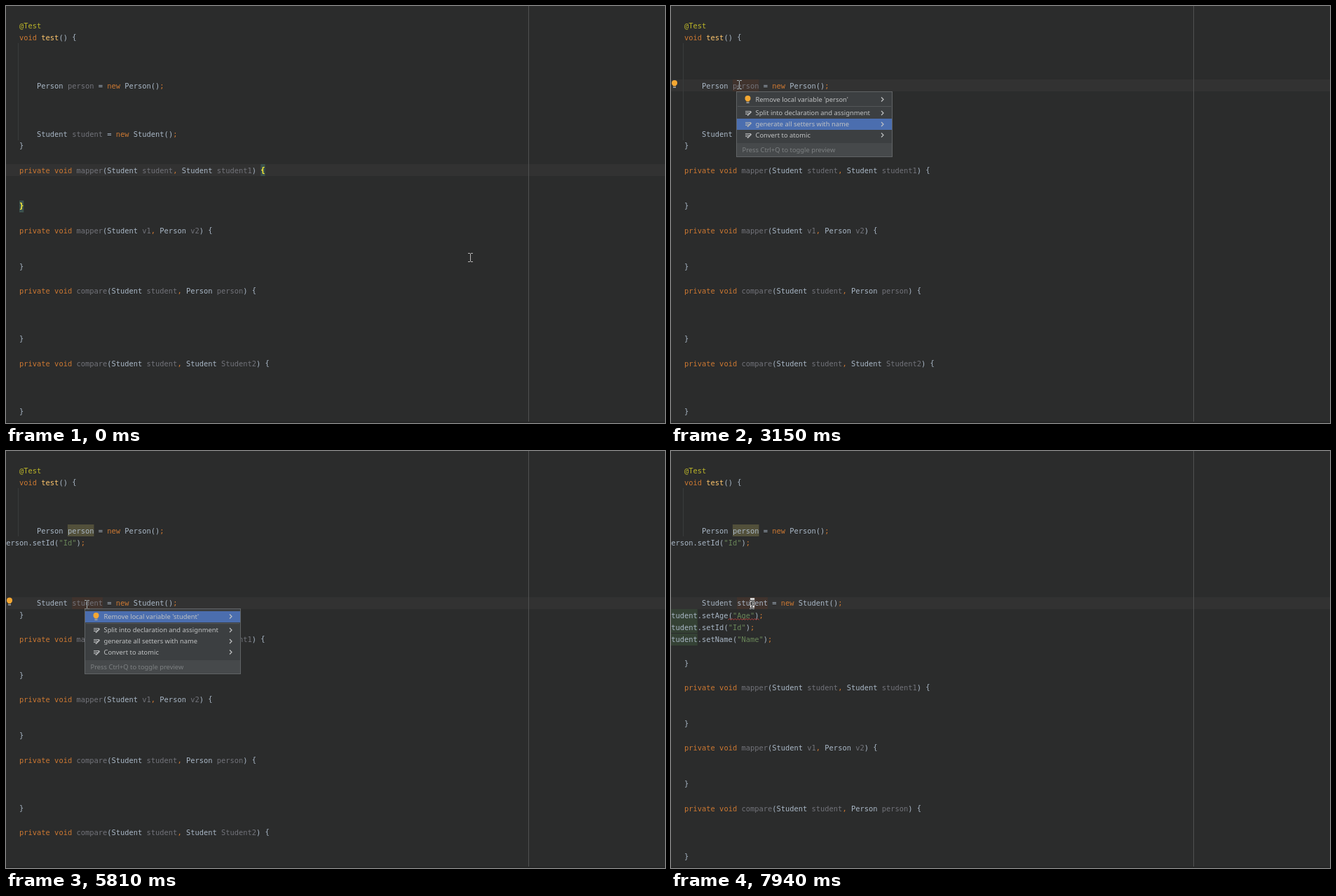
These frames come from a looping animation (940 px wide and 596 px high, 8 s). An HTML page with a canvas:

```html
<!DOCTYPE html>
<html lang="en">
<head>
<meta charset="utf-8">
<title>Editor</title>
<style>
html, body { margin: 0; width: 100%; height: 100%; overflow: hidden; background: #2b2c2c; }
canvas { display: block; }
</style>
</head>
<body>
<canvas id="stage" width="940" height="596"></canvas>
<script>
const g = document.getElementById('stage').getContext('2d');
const LOOP = 8000, CHAR = 6.26, PITCH = 17.25;
const CODE = '10.4px "DejaVu Sans Mono", monospace';
const MENU = '9.35px "Noto Sans", "Open Sans", sans-serif';
const C = {
  text: '#a9b7c6', key: '#cc7832', note: '#bbb529', method: '#ffc66d', unused: '#72737a',
  string: '#6a8759', bg: '#2b2c2c', row: '#323232', write: '#40332d', read: '#52503a',
  template: '#344134', caret: '#d4d4d4', match: '#3b514d', bulb: '#f4a732'
};

const colX = col => -6 + col * CHAR;
const rowTop = n => Math.round(19 + n * PITCH);
const rowMid = n => Math.floor(28 + n * PITCH);
const within = (t, a, b) => t >= a && t < b;

function rect(color, x, y, w, h) {
  g.fillStyle = color;
  g.fillRect(x, y, w, h);
}

function label(str, x, y, color, font) {
  g.font = font;
  g.fillStyle = color;
  g.fillText(str, x, y);
}

function stroke(color, width, points) {
  g.strokeStyle = color;
  g.lineWidth = width;
  g.beginPath();
  points.forEach(([x, y]) => g.lineTo(x, y));
  g.stroke();
}

// Background behind a run of characters
function mark(color, row, col, count) {
  rect(color, colX(col), rowTop(row), count * CHAR, 17);
}

function lines(t) {
  const out = ['    @Test', '    void test() {', '', '', '', '        Person person = new Person();'];
  out.push(...(t < 3680 ? ['', '', ''] : ['person.setId("Id");', '', '', '', '']));
  out.push('        Student student = new Student();');
  if (t >= 7330) out.push('student.setAge("Age");', 'student.setId("Id");', 'student.setName("Name");', '');
  const method = (head, gap) => out.push('', '    private void ' + head + ' {', ...Array(gap).fill(''), '    }');
  out.push('    }');
  method('mapper(Student student, Student student1)', 2);
  method('mapper(Student v1, Person v2)', 2);
  method('compare(Student student, Person person)', 3);
  method('compare(Student student, Student Student2)', 3);
  return out;
}

function tokenColor(word, lit) {
  if (/^(private|void|new|[;,])$/.test(word)) return C.key;
  if (word[0] === '"') return C.string;
  if (word[0] === '@') return C.note;
  if (word === 'test') return C.method;
  if (!lit && /^(mapper|compare|student1?|person|v[12]|Student2)$/.test(word)) return C.unused;
  return C.text;
}

// Braces sit a little higher than the letters
function token(word, row, col, color, font = CODE) {
  const rise = /[{}]/.test(word) ? 1 : 0;
  label(word, colX(col), rowMid(row) + 4 - rise, color, font);
}

function codeLine(str, n, lit) {
  for (const m of str.matchAll(/"\w*"|@?\w+|[^\s\w]/g))
    token(m[0], n, m.index, tokenColor(m[0], lit));
}

function drawCaret(row, col, ch) {
  rect(C.caret, colX(col), rowMid(row) - 7, CHAR, 14);
  token(ch, row, col, C.bg);
}

function bulb(x, y) {
  g.fillStyle = C.bulb;
  g.beginPath();
  g.arc(x, y - 1.5, 4, 0, 7);
  g.fill();
  rect(C.bulb, x - 2, y + 1, 4, 2);
  rect('#a5a8aa', x - 2, y + 4, 4, 1.5);
}

function pencil(x, y) {
  const c = '#afb1b3';
  rect(c, x - 4, y - 3, 8, 1);
  rect(c, x - 4, y - 1, 5, 1);
  rect(c, x - 4, y + 1, 3, 1);
  stroke(c, 2, [[x - 1, y + 3.5], [x + 4.5, y - 2]]);
}

function menu(x, y, name, selected) {
  rect('#606365', x, y, 223, 94);
  rect('#3c3f41', x + 1, y + 1, 221, 92);
  rect('#46494b', x + 1, y + 74, 221, 19);
  rect('#535658', x + 2, y + 21, 219, 1);
  const items = [`Remove local variable '${name}'`, 'Split into declaration and assignment',
    'generate all setters with name', 'Convert to atomic'];
  items.forEach((item, i) => {
    const mid = y + [11.5, 31, 47, 62.5][i];
    if (i === selected) rect('#4b6eaf', x + 1, Math.round(mid - 8), 221, 16);
    if (i) pencil(x + 17, Math.round(mid));
    else bulb(x + 16.5, mid);
    label(item, x + 27.5, Math.round(mid + 3), '#c0c2c3', MENU);
    stroke('#c0c2c3', 1.2, [[x + 207, mid - 3], [x + 210, mid], [x + 207, mid + 3]]);
  });
  label('Press Ctrl+Q to toggle preview', x + 8.5, y + 87, '#7d8082', MENU);
}

const path = [
  [70, 662, 359], [140, 610, 333], [270, 430, 245], [400, 260, 160], [540, 138, 103],
  [610, 104, 92], [680, 88, 91], [740, 87, 99], [805, 91, 109], [880, 95, 111], [1010, 97, 112],
  [4300, 97, 112], [4355, 122, 110], [4490, 122, 110], [4630, 128, 150], [4760, 122, 195],
  [4890, 115, 219], [LOOP + 99, 115, 219]
];

function pointer(t) {
  const s = Math.max(70, Math.ceil(t / 67) * 67);
  const i = path.findIndex(p => p[0] > s);
  const [a, b] = [path[i - 1], path[i]];
  const k = (s - a[0]) / (b[0] - a[0]);
  const x = Math.round(a[1] + (b[1] - a[1]) * k);
  const y = Math.round(a[2] + (b[2] - a[2]) * k);
  // Inverts what lies beneath, like the system text cursor
  g.globalCompositeOperation = 'difference';
  rect('#e4e4e4', x, y - 5, 1, 11);
  for (const end of [-6, 6]) {
    rect('#e4e4e4', x - 3, y + end, 3, 1);
    rect('#e4e4e4', x + 1, y + end, 3, 1);
  }
  g.globalCompositeOperation = 'source-over';
}

function draw(t) {
  const row = t < 1080 ? 12 : t < 5070 ? 5 : 11;
  rect(C.bg, 0, 0, 940, 596);
  rect(C.row, 0, rowTop(row), 940, 17);
  rect('#393b3b', 17, 53, 1, t < 3680 ? 139 : 69);
  rect('#505151', 745, 0, 1, 596);
  rect('#252626', 0, 594, 940, 2);

  const braces = t < 1220;
  if (braces) {
    mark(C.match, 12, 59, 1);
    mark(C.match, 15, 4, 1);
  } else mark(t < 5140 ? C.write : C.read, 5, 15, 6);
  if (t >= 5140) mark(C.write, 11, 16, 7);
  if (within(t, 3680, 5140)) mark(C.template, 6, 0, 6);
  if (t >= 7330) for (const n of [12, 13, 14]) mark(C.template, n, 0, 7);

  lines(t).forEach((str, n) => {
    const lit = /^\w+\./.test(str) || (n === 5 && t >= 4090) || (n === 11 && t >= 7660);
    codeLine(str, n, lit);
  });
  if (braces) {
    token('{', 12, 59, '#ffef28', 'bold ' + CODE);
    token('}', 15, 4, '#ffef28', 'bold ' + CODE);
  }
  if (t >= 7730)
    stroke('#bc3f3c', 1, Array.from({ length: 23 }, (_, i) => [81.5 + i * 2, i % 2 ? 239.5 : 241.5]));

  if (within(t, 400, 930)) drawCaret(12, 59, '{');
  if (within(t, 1080, 2020) || within(t, 3680, 4490)) drawCaret(5, 16, 'e');
  if (within(t, 5070, 5670) || t >= 7330) drawCaret(11, 19, 'd');

  if (within(t, 2020, 3680) || within(t, 4700, 5140)) bulb(5, 111.5);
  if (within(t, 5810, 7330)) bulb(5, 215);
  if (within(t, 2020, 3680)) menu(93, 122, 'person', t < 3010 ? 0 : t < 3150 ? 1 : 2);
  if (within(t, 5810, 7330)) menu(112, 225, 'student', t < 6670 ? 0 : t < 6800 ? 1 : 2);

  // The pointer hides while keys are in use
  if (!within(t, 3680, 4280) && !within(t, 7330, 7940)) pointer(t);
}

const start = performance.now();
function tick() {
  draw((performance.now() - start) % LOOP);
  requestAnimationFrame(tick);
}
tick();
</script>
</body>
</html>
```
